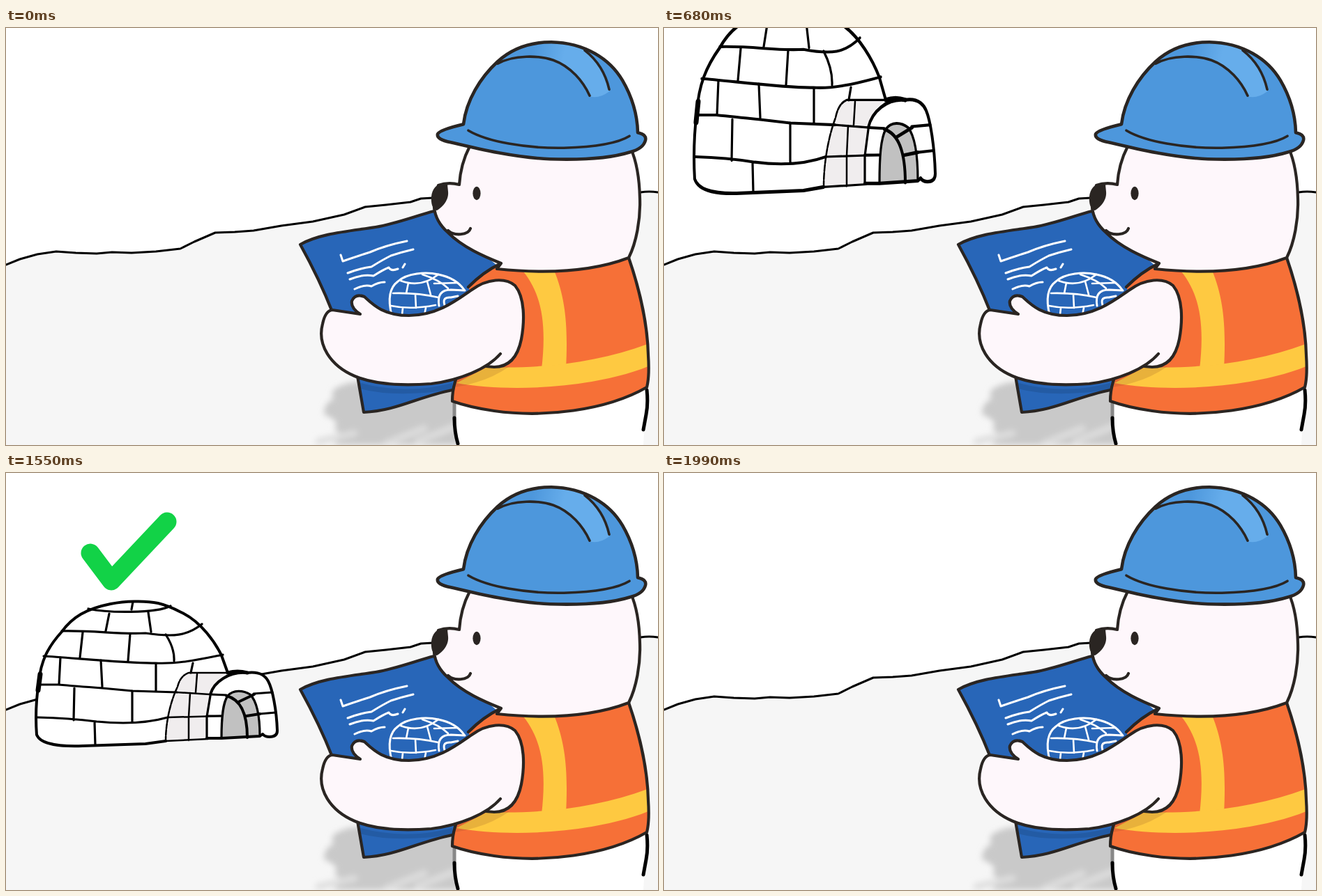
An HTML page that plays this animation: 935x599 px, repeating every 2050 ms.

```html
<!DOCTYPE html>
<html lang="en">
<head>
<meta charset="utf-8">
<title>Igloo builder</title>
<style>
html, body { margin: 0; width: 100%; height: 100%; overflow: hidden; background: #fff; }
svg { display: block; width: 100vw; height: 100vh; }
path { stroke-linecap: round; stroke-linejoin: round; }
.line { fill: none; stroke: #000; stroke-width: 3; }
.ink { fill: none; stroke: #2a2522; stroke-width: 4.2; }
.skin { fill: #fef7fb; }
.chalk { fill: none; stroke: #fff; stroke-width: 3; }
</style>
</head>
<body>
<svg viewBox="0 0 935 599" preserveAspectRatio="none">
  <defs>
    <filter id="soft" x="-20%" y="-30%" width="140%" height="160%"><feGaussianBlur stdDeviation="4.500"/></filter>
    <linearGradient id="shine" gradientUnits="userSpaceOnUse" x1="755" y1="30" x2="800" y2="40">
      <stop offset="0" stop-color="#4d97dc"/><stop offset="1" stop-color="#66adeb"/>
    </linearGradient>
    <mask id="reveal" maskUnits="userSpaceOnUse" x="0" y="0" width="935" height="599">
      <path id="wipe" d="M101 95L123 117L151 155L245 55" fill="none" stroke="#fff" stroke-width="44" style="stroke-linecap:butt"/>
    </mask>
    <path id="ridge" d="M0 340L20 332L45 325L72 321L100 323L130 324L152 322L180 323L215 321L250 317L270 307L300 294L328 293L355 291L395 284L440 278L485 268L515 257L545 254L580 250L595 245L612 244"/>
  </defs>

  <g id="ground">
    <path fill="#f6f6f6" d="M0 340L612 244L935 236V599H0Z"/>
    <use href="#ridge" fill="#f6f6f6"/>
    <path fill="#fff" d="M72 321L100 323L130 324L152 322L180 323L215 321L250 317L270 307L300 294V290H72Z"/>
    <use href="#ridge" class="line"/>
    <path class="line" d="M910 236Q922 234 935 236"/>
  </g>

  <g filter="url(#soft)">
    <path fill="#c9c9c9" d="M480 514Q495 506 520 510H650V599H468Q490 585 470 576Q482 566 456 555Q456 538 470 533Q462 520 480 514Z"/>
    <path fill="none" stroke="#dedede" stroke-width="9" d="M448 594L500 582M545 597L600 575M590 594L650 570"/>
  </g>

  <g id="igloo" visibility="hidden">
    <path fill="#fff" d="M44 376C42 350 44 320 47 300C50 270 60 250 80 228C95 207 115 195 150 188C170 184 200 183 218 187C235 191 245 197 255 202C280 215 300 243 309 262L318 287C340 282 367 284 374 295C382 310 388 340 389 370Q389 379 378 379L362 378L290 382L229 385L200 389L110 392C80 393 50 391 44 376Z"/>
    <path fill="#f0edee" d="M262 287L318 287Q296 299 293 320L288 350V381L229 385C229 360 235 330 246 307Q250 291 262 287Z"/>
    <path fill="#c1c1c1" d="M309 381C309 350 311 330 318 320C326 311 340 312 350 318C360 328 364 350 364 378Z"/>
    <g class="line" style="stroke-width:3.200">
      <path stroke-width="4" d="M318 287L309 262C300 243 280 215 255 202C245 197 235 191 218 187C200 183 170 184 150 188C115 195 95 207 80 228C60 250 50 270 47 300C44 320 42 350 44 376C50 391 80 393 110 392L200 389L229 385"/>
      <path stroke-width="7" d="M49 289L46 312"/>
      <path d="M118 195C145 201 215 202 236 191M182 185L180 196"/>
      <path d="M80 227C130 226 160 232 200 230C240 236 260 234 281 217M148 202L143 227M204 200L208 228"/>
      <path d="M54 263C90 265 180 274 214 273C250 275 290 265 311 261M110 229L106 265M178 231L175 270M229 232Q242 252 241 270"/>
      <path d="M46 304L75 304Q98 306 138 309L181 313L245 315M78 265L76 304M136 269L138 307M215 274V312M268 273L265 287"/>
      <path d="M45 351Q90 352 130 357Q190 363 232 351M98 309L97 355M181 313V357M127 358L128 391"/>
      <path stroke-width="2.500" stroke-dasharray="7 2" d="M229 385C229 360 235 330 246 307Q250 291 262 287"/>
      <path stroke-width="2.500" d="M262 287L318 287M245 315L292 318M232 351L308 349M274 289L272 315M264 316L262 350V384M229 385L290 382"/>
      <path d="M293 320L288 350V381M309 381C309 350 311 330 318 320C326 311 340 312 350 318C360 328 364 350 364 378"/>
      <path stroke-width="4" d="M316 320C336 325 346 345 346 380M333 329L356 318M345 349L364 346"/>
      <path d="M293 318L316 319M288 349H309M355 317L382 315M364 346L387 344"/>
      <path stroke-width="4" d="M293 318C298 300 320 285 345 287C367 284 374 295 376 299C382 310 388 340 389 370Q389 379 378 379Q371 379 368 375L364 378L309 381L288 381"/>
      <path stroke-width="5" d="M318 287Q332 283 346 287"/>
    </g>
  </g>

  <g id="check" visibility="hidden">
    <path mask="url(#reveal)" fill="none" stroke="#12d247" stroke-width="27" d="M121 115L151 155L231 70"/>
    <path id="speck" fill="#12d247" d="M208 71L212 72L211 74Z"/>
  </g>

  <g id="legs">
    <path fill="#fff" d="M643 535L648 599H914L919 515Z"/>
    <path fill="none" stroke="#888" stroke-width="5" d="M643 540L643 562"/>
    <path fill="none" stroke="#000" stroke-width="5" d="M643 560Q643 580 648 597M919 520Q921 540 918 555L914 577"/>
  </g>

  <g id="plan">
    <path fill="#2866b8" d="M422 311C450 295 492 292 530 286C560 281 590 269 614 263L705 342L640 520C590 530 560 550 513 552L504 500L468 408C454 372 438 340 422 311Z"/>
    <path fill="#235ba4" d="M505 509Q570 528 640 510V519Q560 532 507 518Z"/>
    <path class="ink" d="M468 408C454 372 438 340 422 311C450 295 492 292 530 286C560 281 590 269 614 263M504 500L513 552C560 550 590 530 640 520"/>
    <g class="chalk">
      <path d="M480 326L483 335Q500 329 522 322Q545 312 575 306"/>
      <path d="M490 352Q508 345 524 343Q540 333 552 327Q567 322 584 318"/>
      <path d="M493 361Q512 353 527 356Q541 347 549 344Q552 350 562 346M569 344L572 339"/>
      <path d="M500 375Q514 368 524 371Q534 365 543 365"/>
      <path d="M553 412C547 388 550 373 562 364C575 352 602 350 620 354Q645 359 657 376"/>
      <path stroke-width="2.600" d="M555 381Q590 380 620 387M566 363Q595 374 620 354M552 399Q580 405 616 398M577 366L574 381M604 364L609 383M587 383L588 402M569 402L568 412M602 402L600 412M597 354Q622 362 634 374M614 367L648 366"/>
      <path d="M621 399Q617 376 638 376L658 377M629 398Q625 386 638 387L648 385"/>
    </g>
  </g>

  <g id="vest">
    <path fill="#f67037" d="M893 330C905 365 920 420 921 470Q923 500 919 516C860 550 770 560 700 550Q665 545 640 536Q640 520 645 505L690 440L663 372Q685 350 708 339Z"/>
    <path fill="#fec941" d="M742 350L786 348C803 390 806 430 803 490H768C775 430 770 385 742 350Z"/>
    <path fill="#fec941" d="M690 487C770 490 850 480 920 454L921 486C850 515 730 525 646 510Z"/>
    <path fill="#7b3c22" opacity=".17" d="M643 516Q690 509 722 486L690 487L643 506Z"/>
    <path class="ink" d="M893 330C905 365 920 420 921 470Q923 500 919 516C860 550 770 560 700 550Q665 545 640 536Q640 520 645 505M663 372Q685 350 708 339"/>
  </g>

  <g id="head">
    <path class="skin" d="M665 170Q652 195 648 225Q630 221 620 226L614 258Q616 278 634 294C655 315 685 328 710 338L704 346Q820 358 893 330C904 308 910 275 909 245Q908 200 896 173Z"/>
    <path class="ink" d="M665 170Q652 195 650 225Q634 221 620 226M614 258Q616 278 634 294C655 315 685 328 710 338L704 346Q820 358 893 330C904 308 910 275 909 245Q908 200 896 173M634 291C642 299 663 298 666 288"/>
    <path fill="#2a2522" d="M633 225C622 219 611 229 610 242C609 255 613 261 618 262C629 255 635 245 634 235Z"/>
    <ellipse cx="675" cy="237.500" rx="5.600" ry="9.700" fill="#2a2522"/>
  </g>

  <g id="helmet" transform="translate(0 1.200)">
    <path fill="#4d97dc" d="M656 137C660 103 680 70 705 47C727 27 754 19 782 19C830 20 866 43 884 74Q905 110 906 149Q919 152 917 160Q914 172 895 177C860 188 810 188 780 187C730 185 680 173 638 163Q617 159 619 151Q622 145 656 137Z"/>
    <path fill="url(#shine)" d="M712 45Q745 20 785 20Q815 22 830 31C848 45 860 65 865 90Q850 101 837 97C828 76 810 54 785 45Q760 37 712 45Z"/>
    <path class="ink" style="stroke-width:4.600" d="M656 137C660 103 680 70 705 47C727 27 754 19 782 19C830 20 866 43 884 74Q905 110 906 149Q919 152 917 160Q914 172 895 177C860 188 810 188 780 187C730 185 680 173 638 163Q617 159 619 151Q622 145 656 137Z"/>
    <path class="ink" style="stroke-width:3.600" d="M705 50C728 37 765 38 785 45C810 54 828 76 837 96M830 31C848 45 860 65 865 87M663 146C690 162 745 172 800 171Q870 169 894 154"/>
  </g>

  <g id="arm">
    <path class="skin" d="M508 411Q494 402 496 392Q501 381 514 386C525 396 540 413 578 413C618 413 645 392 668 376C690 360 716 358 730 370C744 387 744 420 739 447Q731 487 700 487L688 486C665 500 640 508 610 511C570 514 530 513 500 500C465 485 446 455 454 425Q458 406 468 405Z"/>
    <path class="ink" d="M709 468C690 490 650 506 610 511C570 514 530 513 500 500C465 485 446 455 454 425Q458 406 468 405L508 411Q494 402 496 392Q501 381 514 386C525 396 540 413 578 413C618 413 645 392 668 376C690 360 716 358 730 370C744 387 744 420 739 447Q731 487 700 487L688 486"/>
  </g>
</svg>
<script>
const LOOP = 2050, STEP = 60, BASE = 391;
const get = id => document.getElementById(id);
const igloo = get('igloo'), check = get('check'), wipe = get('wipe'), speck = get('speck');

// The snow fill follows the ridge line down to the bottom of the stage.
const snow = document.querySelector('#ground path');
snow.setAttribute('d', get('ridge').getAttribute('d') + 'L910 236L935 236V599H0Z');
document.querySelectorAll('#ground [fill="#fff"], #ground use[fill]').forEach(el => el.remove());

// time, bottom edge, vertical stretch
const fall = [[440, 13, 1.4], [680, 236, 1.275], [800, 333, 1.12], [860, BASE, 1]];
// time, shift left
const slide = [[1690, 0], [1750, 57], [1810, 145], [1930, 345]];

function at(keys, t, col) {
  const i = keys.findIndex(k => k[0] >= t);
  if (i < 0) return keys[keys.length - 1][col];
  if (i === 0) return keys[0][col];
  const a = keys[i - 1], b = keys[i];
  return a[col] + (b[col] - a[col]) * (t - a[0]) / (b[0] - a[0]);
}

const snap = (t, from) => from + Math.floor((t - from) / STEP) * STEP;
const show = (el, on) => el.setAttribute('visibility', on ? 'inherit' : 'hidden');

function draw(t) {
  const tf = snap(t, 440), ts = t < 1750 ? 1690 : snap(t, 1750);
  const dx = at(slide, ts, 1);
  show(igloo, t >= 440 && t < 1990);
  igloo.setAttribute('transform',
    `translate(${-dx} ${at(fall, tf, 1) + dx / 3}) scale(1 ${at(fall, tf, 2)}) translate(0 ${-BASE})`);

  const p = Math.max(0, Math.min(1, (snap(t, 1310) - 1310) / 240));
  show(check, t >= 1310 && t < 1990);
  show(speck, t < 1370);
  check.setAttribute('transform', `translate(${-dx * .93} ${dx * .28})`);
  wipe.setAttribute('stroke-dasharray', `${32 + p * 190} 400`);
}

const start = performance.now();
function tick(now) {
  draw(Math.max(0, now - start) % LOOP);
  requestAnimationFrame(tick);
}
draw(0);
requestAnimationFrame(tick);
</script>
</body>
</html>
```
